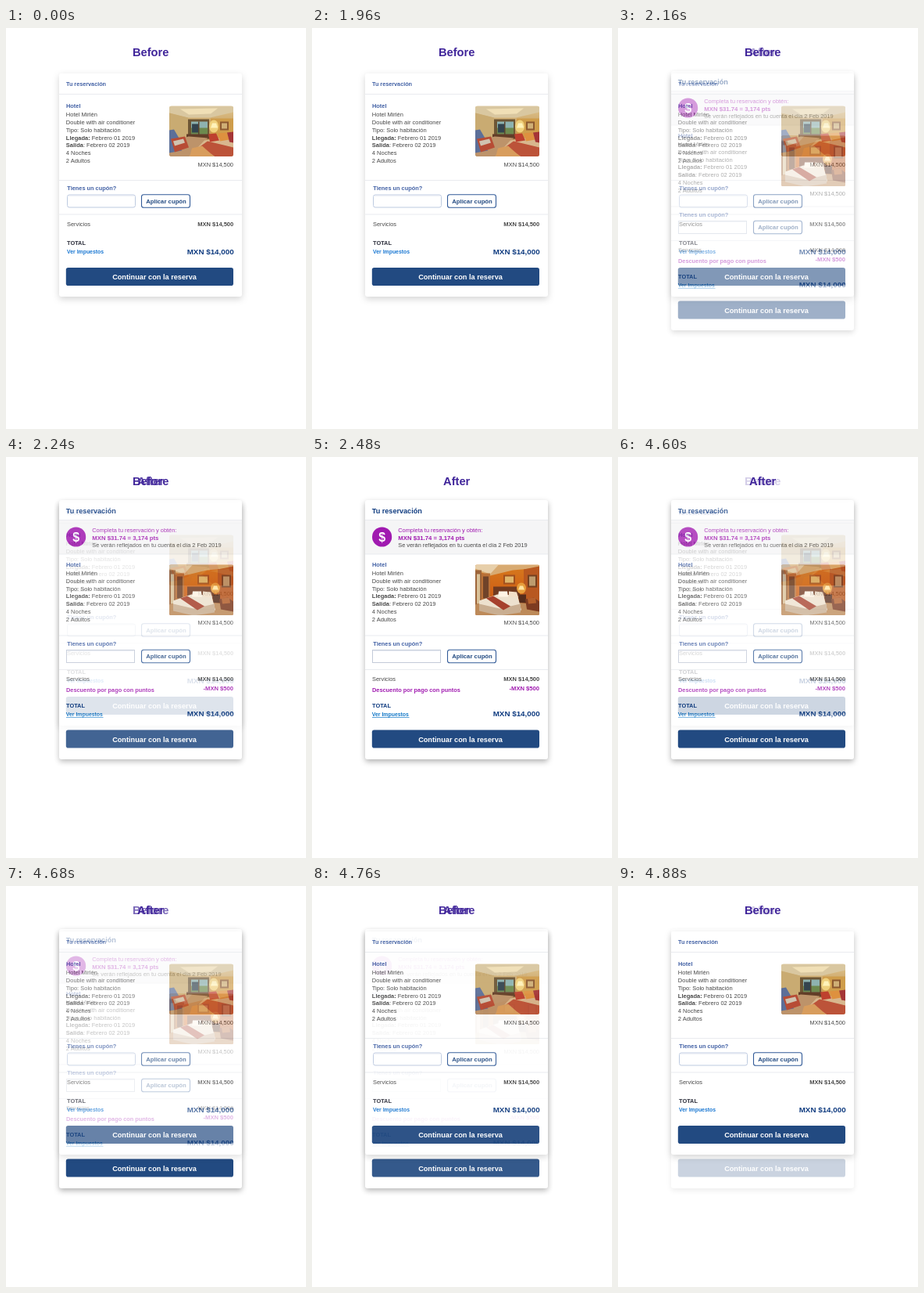
An HTML page that plays this animation: 384x512 px, repeating every 4920 ms.

```html
<!DOCTYPE html>
<html lang="es">
<head>
<meta charset="utf-8">
<title>Before / After</title>
<style>
  html, body { margin: 0; width: 100%; height: 100%; overflow: hidden; background: #fff; }
  svg { position: absolute; left: 0; top: 0; width: 384px; height: 512px; }
  text { font-family: "Liberation Sans", Arial, sans-serif; white-space: pre; }
  .soft { filter: drop-shadow(0 3px 4px rgba(0, 0, 0, .17)); }
  .deep { filter: drop-shadow(0 3px 3.5px rgba(0, 0, 0, .3)); }
</style>
</head>
<body>
<svg id="before" viewBox="0 0 384 512"></svg>
<svg id="after" viewBox="0 0 384 512"></svg>
<script>
const NAVY = '#224a81', BLUE = '#4261a5', DEEP = '#103c80', GREY = '#484848',
      PURPLE = '#a01ab0', TITLE = '#40259a', LINE = '#e9ebef';

const text = (x, y, size, fill, str, { bold = false, anchor = 'start', extra = '' } = {}) =>
  `<text x="${x}" y="${y}" font-size="${size}" fill="${fill}" text-anchor="${anchor}"
    font-weight="${bold ? 700 : 400}" ${extra}>${str}</text>`;
const bold = (x, y, size, fill, str, anchor, extra) => text(x, y, size, fill, str, { bold: true, anchor, extra });
const rect = (x, y, w, h, fill, r = 0, extra = '') =>
  `<rect x="${x}" y="${y}" width="${w}" height="${h}" rx="${r}" fill="${fill}" ${extra}/>`;
const poly = (points, fill) => `<polygon points="${points}" fill="${fill}"/>`;
const oval = (x, y, rx, ry, fill) => `<ellipse cx="${x}" cy="${y}" rx="${rx}" ry="${ry}" fill="${fill}"/>`;
const rule = y => rect(68, y, 234, 1, LINE);
const gradient = (id, ...stops) => `<linearGradient id="${id}" x2="0" y2="1">${
  stops.map((c, i) => `<stop offset="${i / (stops.length - 1)}" stop-color="${c}"/>`).join('')}</linearGradient>`;

const photo = (id, y, r, art) => `
  <clipPath id="${id}">${rect(0, 0, 82, 64.5, '#000', r)}</clipPath>
  <g transform="translate(209 ${y})"><g clip-path="url(#${id})">${art}</g></g>`;

const loungeArt = gradient('warm', '#e0c58e', '#c39a5c', '#a77746') +
  rect(0, 0, 82, 65, 'url(#warm)') +
  poly('0,0 82,0 82,8 52,15 24,15 0,9', '#d9c7a0') +
  poly('14,4 62,3 53,10 25,11', '#f0dfb6') +
  poly('0,9 24,15 24,41 0,48', '#c9ab72') +
  rect(24, 17, 27, 23, '#6d5635') + rect(28, 20, 21, 16, '#8eb3b0') +
  rect(28, 28, 21, 8, '#6d8a4e') + rect(37, 20, 1.5, 18, '#5a432e') +
  rect(29, 23, 8, 11, '#33444e') +
  rect(53, 16, 29, 25, '#cf9d4b') + rect(65, 20, 11, 11, '#8c5930') + rect(67, 22, 7, 7, '#cfaf76') +
  oval(57, 26, 6, 8, '#efd07c') + poly('55,22 60,22 62,28 53,28', '#fff2b9') +
  rect(22, 36, 30, 6, '#623d27') + poly('0,45 25,39 49,41 31,65 0,65', '#bd936a') +
  poly('0,31 6,30 13,42 16,57 0,60', '#5c6f99') + poly('2,42 20,39 25,53 7,59', '#b74c35') +
  poly('5,45 18,42 20,47 7,51', '#d0c3b0') +
  poly('45,44 82,38 82,65 25,65', '#d8b78e') + poly('49,45 82,53 82,65 59,65 39,52', '#bc5339') +
  poly('50,36 60,35 64,44 52,46', '#be402e') + poly('62,35 73,34 77,43 65,45', '#de913f') +
  poly('74,34 82,33 82,47 77,46', '#a53536') + poly('29,54 42,51 58,65 26,65', '#d89d5d');

const bedroomArt = gradient('wall', '#d67a1e', '#d16316', '#bb5a20') +
  rect(0, 0, 82, 65, 'url(#wall)') +
  poly('0,0 82,0 82,4 48,7 19,14 0,7', '#d8aa71') + poly('0,0 30,0 19,12 0,5', '#e7cfaa') +
  rect(0, 7, 8, 47, '#9d653a') + rect(2, 12, 4, 38, '#d9c198') + rect(8, 11, 11, 36, '#b97037') +
  rect(10, 15, 7, 28, '#704329') +
  poly('62,6 82,2 82,54 62,47', '#b85820') + rect(67, 13, 12, 16, '#75401f') + rect(69, 15, 8, 12, '#bd9c6e') +
  rect(36, 13, 15, 12, '#a2501e') + rect(38, 15, 11, 8, '#dfb66d') +
  rect(23, 28, 34, 16, '#713a20') + oval(59, 30, 6, 7, '#e79d3b') +
  poly('57,27 61,27 63,32 55,32', '#ffe4a0') + rect(56, 38, 9, 11, '#552c1b') +
  poly('0,51 18,45 82,51 82,65 0,65', '#bd8a59') +
  poly('5,46 28,38 54,39 59,58 31,63 5,56', '#ede1ce') + poly('5,50 31,56 58,50 58,61 31,65 5,59', '#c9ae91') +
  poly('14,43 23,40 45,53 36,58', '#a6402c') +
  poly('30,34 41,34 42,41 29,41', '#fff4e5') + poly('43,34 53,35 55,42 43,41', '#f2dfc8') +
  poly('64,44 75,42 82,47 82,60 66,57', '#7d3b21') + poly('67,43 77,42 78,49 68,50', '#b5602c');

const details = y => {
  const lines = ['Hotel Mirlén', 'Double with air conditioner', 'Tipo: Solo habitación',
    '<tspan font-weight="700">Llegada:</tspan> Febrero 01 2019',
    '<tspan font-weight="700">Salida</tspan>: Febrero 02 2019', '4 Noches', '2 Adultos'];
  return bold(77, y, 7.4, BLUE, 'Hotel') +
    lines.map((s, i) => text(76.8, y + 11.4 + i * 9.75, 7.5, GREY, s)).join('') +
    text(291, y + 74.6, 7.45, GREY, 'MXN $14,500', { anchor: 'end' });
};

const coupon = (y, x, r, edge) =>
  bold(78.3, y - 5.3, 7.36, BLUE, 'Tienes un cupón?') +
  rect(x + .5, y + .5, 87, 16, '#fff', r, `stroke="${edge}"`) +
  rect(x + 1.5, y + 1.2, 85, 1, '#e8ecf3') +
  rect(173.5, y + .2, 62, 16.6, '#fff', 2.8, 'stroke="#325b98" stroke-width="1.1"') +
  bold(205, y + 11.3, 7.75, NAVY, 'Aplicar cupón', 'middle');

const submit = y => rect(76.8, y, 214.2, 23, NAVY, 2.8) +
  bold(190, y + 15.2, 9.2, '#fff', 'Continuar con la reserva', 'middle');

const card = (y, h, shadow) => rect(68, y, 234, h, '#fff', 3, `class="${shadow}"`);

const before = document.getElementById('before');
const after = document.getElementById('after');

before.innerHTML =
  bold(185.2, 35.7, 14.7, TITLE, 'Before', 'middle') +
  card(58, 285, 'soft') + rule(84) + rule(194) + rule(237.5) +
  bold(77, 74, 7.25, BLUE, 'Tu reservación') +
  details(102) + photo('clipLounge', 99.5, 3, loungeArt) +
  coupon(212.5, 78, 2.5, '#bdcae0') +
  text(78, 253.2, 7.4, GREY, 'Servicios') +
  bold(291.2, 253.2, 7.5, GREY, 'MXN $14,500', 'end') +
  bold(78, 277, 7.4, '#30323f', 'TOTAL') +
  bold(78, 288.3, 6.9, '#1b78d2', 'Ver Impuestos') +
  bold(291.6, 289.2, 9.8, DEEP, 'MXN $14,000', 'end') +
  submit(306);

after.innerHTML =
  bold(185.2, 35.7, 14.7, TITLE, 'After', 'middle') +
  card(55, 331, 'deep') + rect(68, 80.5, 234, 43.5, '#f5f5f6') +
  rule(80) + rule(123.5) + rule(227.5) + rule(271) +
  bold(76.8, 72.2, 9.1, DEEP, 'Tu reservación') +
  oval(89.6, 102, 12.6, 12.6, PURPLE) +
  bold(89.6, 107.6, 16, '#fff', '$', 'middle') +
  text(110.3, 95.6, 7.36, PURPLE, 'Completa tu reservación y obtén:') +
  bold(110.3, 105.8, 7.75, PURPLE, 'MXN $31.74 = 3,174 pts') +
  text(110.3, 115.3, 7.37, GREY, 'Se verán reflejados en tu cuenta el día 2 Feb 2019') +
  details(139.8) + photo('clipBedroom', 137.5, 2, bedroomArt) +
  coupon(246, 77, 0, '#c3cad8') +
  text(77, 286, 7.4, GREY, 'Servicios') +
  bold(291.2, 286, 7.5, GREY, 'MXN $14,500', 'end') +
  bold(77, 299.5, 7.37, PURPLE, 'Descuento por pago con puntos') +
  bold(291, 298, 7.6, PURPLE, '-MXN $500', 'end') +
  bold(77, 319.5, 7.4, DEEP, 'TOTAL') +
  bold(76.8, 330.7, 6.9, '#1479c8', 'Ver Impuestos') + rect(77, 332, 47.5, .7, '#1479c8') +
  bold(291.6, 331.2, 9.8, DEEP, 'MXN $14,000', 'end') +
  submit(348.5);

const LOOP = 4920, STEP = 40, TO_AFTER = 1960, TO_BEFORE = 4440, SPAN = 520;

const ease = p => {
  p = Math.min(1, Math.max(0, p));
  return p < .5 ? 4 * p ** 3 : 1 - 4 * (1 - p) ** 3;
};

// The incoming card fades in on top; the outgoing one fades away later.
function dissolve(incoming, outgoing, t) {
  incoming.style.zIndex = 2;
  outgoing.style.zIndex = 1;
  incoming.style.opacity = t >= SPAN ? 1 : ease(t / 420);
  outgoing.style.opacity = t >= SPAN ? 0 : 1 - ease((t - 220) / 360);
}

function show(ms) {
  const t = Math.floor(ms % LOOP / STEP) * STEP;
  if (t < TO_AFTER) dissolve(before, after, SPAN);
  else if (t < TO_BEFORE) dissolve(after, before, t - TO_AFTER);
  else dissolve(before, after, t - TO_BEFORE);
}

const start = performance.now();
function tick() {
  show(performance.now() - start);
  requestAnimationFrame(tick);
}
tick();
</script>
</body>
</html>
```
